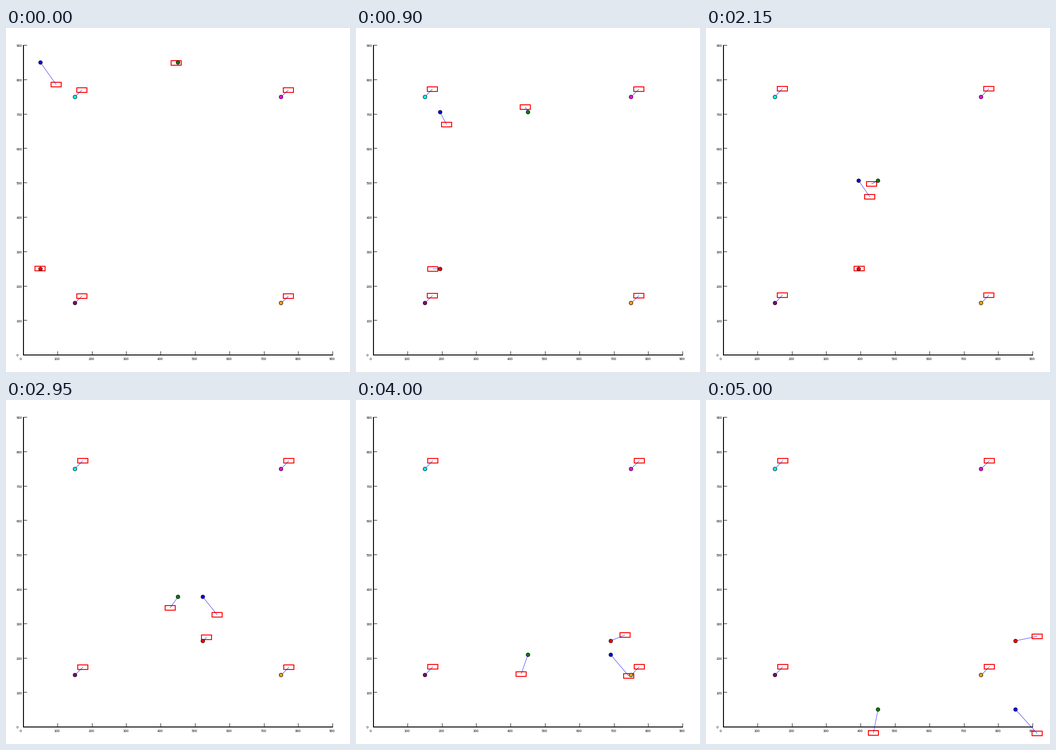
These frames come from a looping animation (748 px wide and 748 px high, 5050 ms). A matplotlib script:

```python
import numpy as np
import matplotlib.pyplot as plt
from matplotlib.animation import FuncAnimation
from matplotlib.patches import Circle, Rectangle

SIZE, DPI = 748, 100
FRAMES, STEP_MS = 101, 50
SCALE = 0.748          # pixels per unit
MARGIN = 50            # units around the plot
PX = 72 / DPI
LAG = 4.5              # frames a label needs to catch up with its point
HALF_W, HALF_H = 11, 5

fig = plt.figure(figsize=(SIZE / DPI, SIZE / DPI), dpi=DPI, facecolor="white")
ax = fig.add_axes([0, 0, 1, 1])
ax.set_xlim(0, SIZE)
ax.set_ylim(SIZE, 0)
ax.axis("off")


def to_px(x, y):
    return np.array([(x + MARGIN) * SCALE, SIZE - (y + MARGIN) * SCALE])


def smooth(*keys):
    """Return a smooth curve through (frame, value) keys."""
    t, v = np.array(keys, float).T
    slope = np.gradient(v, t)

    def curve(n):
        i = min(np.searchsorted(t, n, side="right") - 1, len(t) - 2)
        h = t[i + 1] - t[i]
        s = (n - t[i]) / h
        return ((1 + 2 * s) * (1 - s) ** 2 * v[i] + s * (1 - s) ** 2 * h * slope[i]
                + s * s * (3 - 2 * s) * v[i + 1] + s * s * (s - 1) * h * slope[i + 1])

    return curve


def settle(start, gain, frames):
    return lambda n: start + gain * (1 - np.exp(-n / frames))


def linear(start, rate):
    return lambda n: start + rate * n


rest = settle(15.2, 2.2, 30), settle(-15, -3, 22)

# Colour, start, speed per frame, label drift in pixels
POINTS = [
    ("#0000ff", (50, 850), (8, -8), (linear(34, 0.4), linear(48.2, 0.31))),
    ("#008000", (450, 850), (0, -8),
     (smooth((0, -4), (18, -5.5), (60, -17.5), (100, -10)),
      smooth((0, 1.5), (18, 15.5), (43, 33.5), (70, 63), (100, 78)))),
    ("#ff0000", (50, 250), (8, 0),
     (smooth((0, -1), (18, 11), (43, 28), (59, 35), (89, 67), (100, 73.5)),
      smooth((0, -0.6), (43, -1), (75, -13), (100, -10)))),
    ("#00ffff", (150, 750), (0, 0), rest),
    ("#ff00ff", (750, 750), (0, 0), rest),
    ("#800080", (150, 150), (0, 0), rest),
    ("#ffa500", (750, 150), (0, 0), rest),
]


def segment(x0, y0, x1, y1, width):
    ax.plot([x0, x1], [y0, y1], color="black", lw=width * PX,
            solid_capstyle="butt", snap=False, zorder=1)


def label(x, y, value):
    ax.text(x, y, str(value), family="Liberation Sans", size=10 * SCALE * PX,
            color="black", ha="left", va="baseline", zorder=1)


def draw_axes():
    left, base = 38, 711
    segment(left, left - 1, left, base + 1, 2)
    segment(left - 1, base, base, base, 2)
    for value in range(0, 901, 100):
        tx, ty = to_px(value, value)
        if value:
            cx, cy = np.floor([tx + 1e-6, ty + 1e-6]) + 0.5
            segment(cx, base - 8, cx, base, 1)
            segment(left, cy, left + 8, cy, 1)
        label(tx - 10 * SCALE, base + 11, value)
        label(left - 15.6, ty + 5 * SCALE, value)


def make_parts(color):
    box = Rectangle((0, 0), 2 * HALF_W, 2 * HALF_H, fill=False, ec="#ff0000",
                    lw=2 * PX, joinstyle="miter", snap=False, zorder=2)
    dot = Circle((0, 0), 4, fc=color, ec="black", lw=PX, zorder=4)
    link, = ax.plot([], [], color="#0000ff", lw=SCALE * PX, snap=False, zorder=3)
    return ax.add_patch(box), ax.add_patch(dot), link


draw_axes()
parts = [make_parts(point[0]) for point in POINTS]


def draw(n):
    catch_up = LAG * (1 - np.exp(-n / LAG))
    for (_, start, speed, drift), (box, dot, link) in zip(POINTS, parts):
        now = np.add(start, np.multiply(speed, n))
        px, py = to_px(*now)
        lx = round(px + drift[0](n) - speed[0] * SCALE * catch_up)
        ly = round(py + drift[1](n) + speed[1] * SCALE * catch_up)
        box.set_xy((lx - HALF_W, ly - HALF_H))
        dot.center = (round(px), round(py))
        link.set_data([px, lx], [py, ly])
    return [p for group in parts for p in group]


anim = FuncAnimation(fig, draw, frames=FRAMES, interval=STEP_MS,
                     init_func=lambda: draw(0), repeat=True, repeat_delay=0,
                     blit=False)
plt.show()
```
